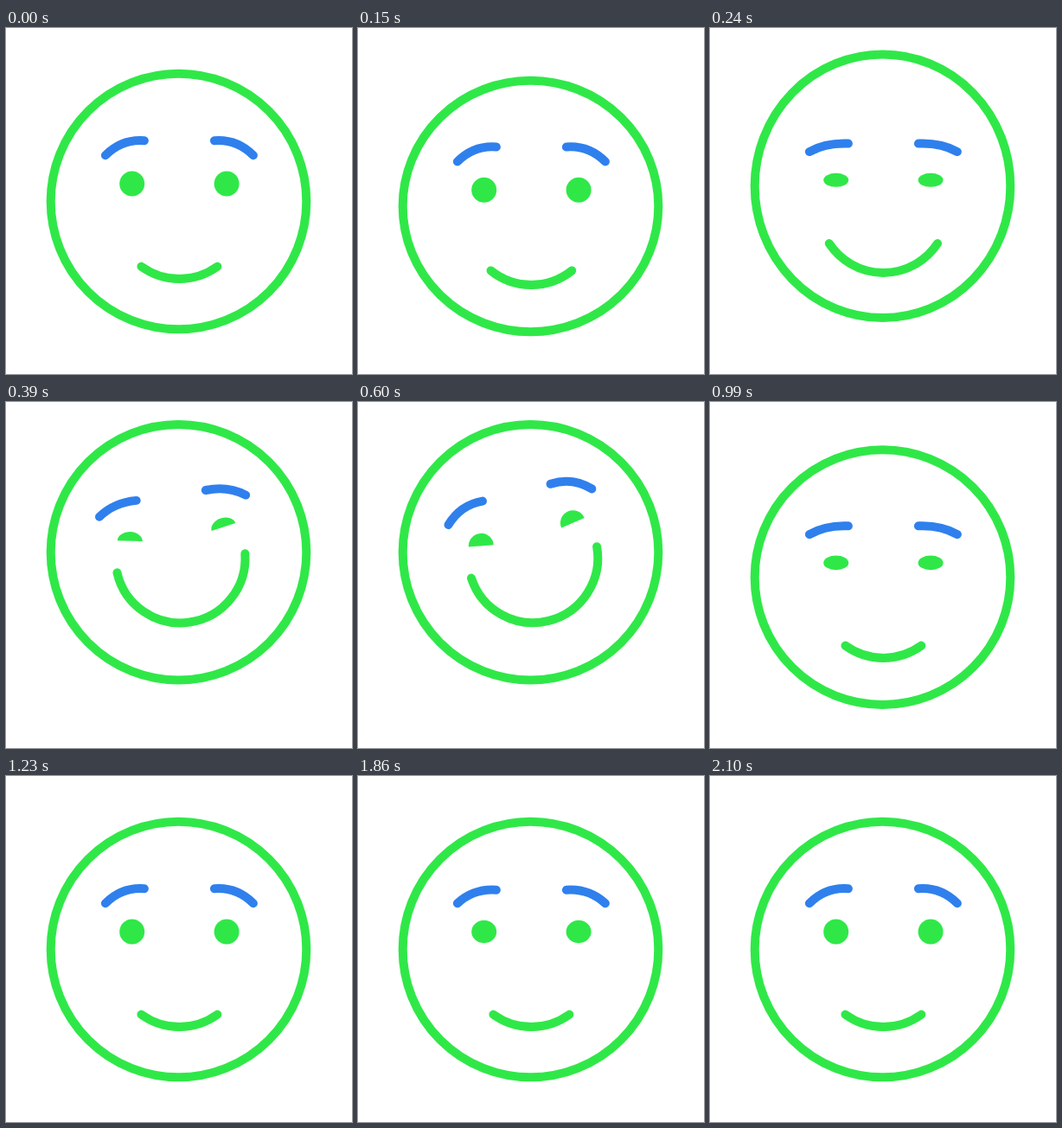
Animation, 400 px wide and 400 px high, one loop 3.15 s. Source, as an HTML page:

```html
<!DOCTYPE html>
<html lang="en">
<head>
<meta charset="utf-8">
<title>Happy face</title>
<style>
  html, body { margin: 0; width: 100%; height: 100%; overflow: hidden; background: #fff; }
  svg { display: block; width: 100%; height: 100%; }
  .line { fill: none; stroke: #2fe848; stroke-width: 10; stroke-linecap: round; }
  .brow { stroke: #2f80ed; }
  .eye { fill: #2fe848; }
</style>
</head>
<body>
<svg viewBox="0 0 400 400">
  <ellipse id="head" class="line" cx="199.5" rx="147.8"/>
  <g id="features">
    <path class="line brow"/><path class="line brow"/>
    <path class="eye"/><path class="eye"/>
    <path id="mouth" class="line"/>
  </g>
</svg>
<script>
const LOOP = 3150, CENTER_Y = 200.5, HEAD_R = 147.8, EYE_R = 14.5, MOUTH_R = 75;
const SQUINT_START = 308, SQUINT_END = 922, IDLE_BLINK = 1965;

const smooth = u => (1 - Math.cos(Math.PI * Math.min(1, Math.max(0, u)))) / 2;
const ramp = (t, from, to) => smooth((t - from) / (to - from));
// Rises 0 to 1, holds, then returns to 0.
const hold = (t, riseFrom, riseTo, fallFrom, fallTo) => ramp(t, riseFrom, riseTo) - ramp(t, fallFrom, fallTo);
// A single swell around one moment.
const bump = (t, mid, half) => smooth(1 - Math.abs(t - mid) / half);

const head = document.getElementById('head');
const features = document.getElementById('features');
const mouth = document.getElementById('mouth');
const brows = document.querySelectorAll('.brow');
const eyes = document.querySelectorAll('.eye');

const arc = `A${EYE_R} ${EYE_R} 0 0 1 `;
const halfEye = `M${-EYE_R} 0${arc}${EYE_R} 0`;
const fullEye = `${halfEye}${arc}${-EYE_R} 0`;

function drawHead(t) {
  const crouch = bump(t, 115, 115), landing = bump(t, 925, 95), rebound = bump(t, 1110, 110);
  const lift = 26.8 * hold(t, 100, 333, 690, 940);
  const stretch = 1 - .024 * crouch + .03 * bump(t, 240, 100)
    + .021 * bump(t, 780, 100) - .017 * landing + .005 * rebound;
  head.setAttribute('cy', CENTER_Y - lift + 11 * crouch + 10 * landing - 1.5 * rebound);
  head.setAttribute('ry', HEAD_R * stretch);
}

// The features follow the head a little late.
function drawFeatures(t) {
  const drop = 8 * (bump(t, 130, 110) + bump(t, 960, 90)) - bump(t, 1130, 80);
  const y = CENTER_Y - 27.6 * hold(t, 190, 390, 715, 975) + drop;
  const turn = -14.1 * hold(t, 250, 500, 700, 970);
  features.setAttribute('transform', `translate(200.4 ${y}) rotate(${turn})`);
}

function drawEyes(t, smile) {
  const shut = [SQUINT_START, SQUINT_END, IDLE_BLINK].reduce((sum, mid) => sum + bump(t, mid, 130), 0);
  const lid = 1 - .94 * shut;
  const squint = t >= SQUINT_START && t < SQUINT_END;
  const tilt = squint ? 29 - 19.5 * smile : 0;
  [-1, 1].forEach((side, i) => {
    brows[i].setAttribute('d', `M${side * 85.5} -53.3q${side * -19} ${-19 * lid} ${side * -45} ${-17 * lid}`);
    eyes[i].setAttribute('d', squint ? halfEye : fullEye);
    eyes[i].setAttribute('transform', `translate(${side * 54.7} -20.5) rotate(${-side * tilt}) scale(1 ${lid})`);
  });
}

function drawMouth(smile) {
  const angle = (35.9 + 50 * smile) * Math.PI / 180;
  const x = MOUTH_R * Math.sin(angle);
  const y = 14.5 - 7 * smile + MOUTH_R * Math.cos(angle);
  mouth.setAttribute('d', `M${-x} ${y}A${MOUTH_R} ${MOUTH_R} 0 0 0 ${x} ${y}`);
}

function draw(t) {
  const smile = hold(t, 105, 410, 660, 940);
  drawHead(t);
  drawFeatures(t);
  drawEyes(t, smile);
  drawMouth(smile);
}

const start = performance.now();
function frame() {
  draw((performance.now() - start) % LOOP);
  requestAnimationFrame(frame);
}
frame();
</script>
</body>
</html>
```
